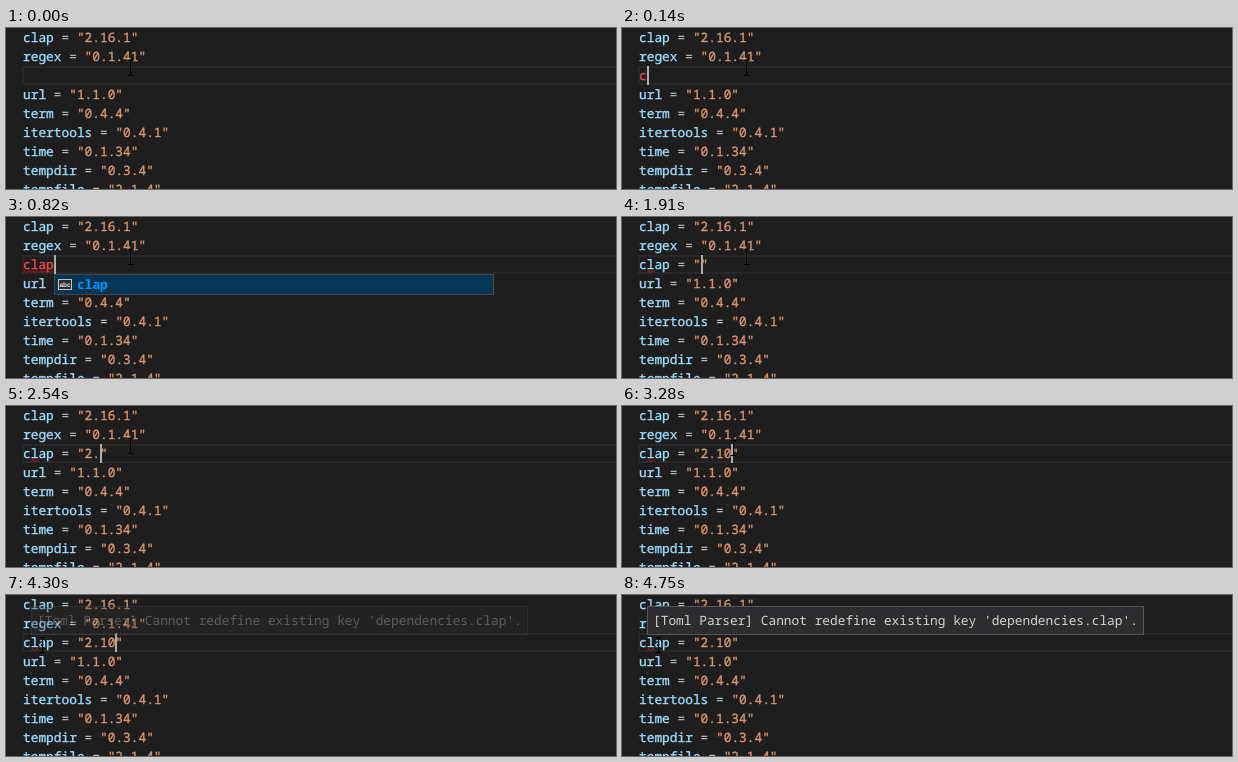
These frames come from a looping animation (610x161 px, 4980 ms). An HTML page:

```html
<!DOCTYPE html>
<html lang="en">
<head>
<meta charset="utf-8">
<title>Editing a manifest</title>
<style>
html, body { margin: 0; width: 100%; height: 100%; overflow: hidden; background: #1e1e1e; }
svg { display: block; width: 610px; height: 161px; }
text { font: 12.83px "Noto Sans Mono", "DejaVu Sans Mono", monospace; white-space: pre;
  text-rendering: geometricPrecision; fill: #d4d4d4; }
.key, .str, .bad { stroke-width: .35px; }
.key { fill: #9cdcfe; stroke: #9cdcfe; }
.str { fill: #d9946f; stroke: #d9946f; }
.bad { fill: #f44747; stroke: #f44747; }
.hit { fill: #0097fb; font-weight: bold; }
.abc { font: bold 6.5px "Liberation Sans", sans-serif; fill: #e8e8e8; }
</style>
</head>
<body>
<svg viewBox="0 0 610 161"><g id="page"></g><g id="live"></g></svg>
<script>
const LOOP = 4980, LEFT = 17, CELL = 7.7, ROW = 19;
const page = document.getElementById('page'), live = document.getElementById('live');

const span = (cls, s) => `<tspan class="${cls}">${s}</tspan>`;
const text = (x, y, s) => `<text x="${x}" y="${y}">${s}</text>`;
const rect = (x, y, w, h, fill, more = '') =>
  `<rect x="${x}" y="${y}" width="${w}" height="${h}" fill="${fill}" ${more}/>`;

// Colours one "key = value" line; a key without "=" is an error.
function code(s) {
  const [, key, eq, value] = s.match(/^(\w*)([ =]*)(.*)$/);
  return span(eq.includes('=') ? 'key' : 'bad', key) + eq + span('str', value);
}
const codeRow = (row, s) => text(LEFT, row * ROW + 14, code(s));

page.innerHTML = rect(17, 39, 600, 17, 'none', 'stroke="#282828" stroke-width="2"') +
  ['clap = "2.16.1"', 'regex = "0.1.41"', '', 'url = "1.1.0"', 'term = "0.4.4"',
   'itertools = "0.4.1"', 'time = "0.1.34"', 'tempdir = "0.3.4"', 'tempfile = "2.1.4"']
  .map((s, i) => codeRow(i, s)).join('');

// Last value whose start time has passed.
const at = (steps, t) => steps.filter(s => s[0] <= t).pop()[1];

const typed = [[0, ''], [80, 'c'], [300, 'cl'], [450, 'cla'], [680, 'clap'], [1060, 'clap '],
  [1380, 'clap ='], [1520, 'clap = '], [1770, 'clap = ""'], [2220, 'clap = "2"'],
  [2540, 'clap = "2."'], [2680, 'clap = "2.1"'], [2880, 'clap = "2.10"']];
const caretOn = [[0, false], [80, true], [3300, false], [3800, true], [4750, false]];
const popupCol = [[0, 0], [150, 1], [380, 2], [530, 3], [750, 4], [1060, 0]];
const squiggle = [[0, [0, 0]], [150, [17, 25]], [300, [17, 33]], [530, [17, 40]],
  [750, [17, 48]], [1450, [0, 0]], [1840, [25, 33]]];

function wave([from, to]) {
  let d = '';
  for (let x = from, i = 0; x <= to; x += 2, i++) d += `${d ? 'L' : 'M'}${x} ${i % 2 ? 53.5 : 55.5}`;
  return `<path d="${d}" fill="none" stroke="#e01515" stroke-width=".9"/>`;
}

function popup(col, word, t) {
  const x = Math.round(LEFT + col * CELL);
  const items = t < 300 ? ['clap', 'crate', 'cargo', 'config', 'core'] : ['clap'];
  return rect(x + .5, 57.5, 439, items.length * ROW + 1, '#252526', 'stroke="#454545"') +
    rect(x + 1, 58, 438, ROW, '#073655') +
    items.map((item, i) => {
      const y = 58 + i * ROW, n = word.length;
      return rect(x + 4.5, y + 4.5, 13, 10, '#2d2d30', 'stroke="#c5c5c5"') +
        `<text class="abc" x="${x + 5.5}" y="${y + 12}">abc</text>` +
        text(x + 23, y + 14, span('hit', item.slice(0, n)) + item.slice(n));
    }).join('');
}

function mouse(t) {
  const part = (start, end, steps) =>
    Math.max(0, Math.min(1, (Math.floor((t - start) / (end - start) * (steps - 1)) + 1) / steps));
  const ease = p => p * p * (3 - 2 * p);
  const go = ease(part(3200, 3720, 8)), settle = part(3800, 3940, 3), lift = part(4080, 4220, 3);
  const x = Math.round(125 - 86 * go - 4 * settle + 2 * lift) - .5;
  const y = Math.round(40 + 15 * go - 5 * lift);
  return `<path d="M${x - 3} ${y - 7.5}h2.5l.5 .5l.5 -.5h2.5M${x} ${y - 7}v14` +
    `M${x - 3} ${y + 7.5}h2.5l.5 -.5l.5 .5h2.5" fill="none" stroke="#000"/>`;
}

function tooltip(t) {
  const shown = Math.min(1, (Math.floor((t - 4290) / 75) + 1) / 3);
  return shown <= 0 ? '' : `<g opacity="${shown}">` +
    rect(25.5, 11.5, 496, 28, '#2d2d30', 'stroke="#555"') +
    text(31, 30, "[Toml Parser] Cannot redefine existing key 'dependencies.clap'.") + '</g>';
}

function scene(t) {
  const word = at(typed, t), col = at(popupCol, t);
  const caret = Math.round(LEFT + (word.length - word.endsWith('"')) * CELL);
  return codeRow(2, word) + wave(at(squiggle, t)) +
    (at(caretOn, t) ? rect(caret, 38, 2, 19, '#aeafad') : '') +
    (col ? popup(col, word, t) : '') + mouse(t) + tooltip(t);
}

let last;
function draw() {
  const next = scene(performance.now() % LOOP);
  if (next !== last) live.innerHTML = last = next;
  requestAnimationFrame(draw);
}
draw();
</script>
</body>
</html>
```
